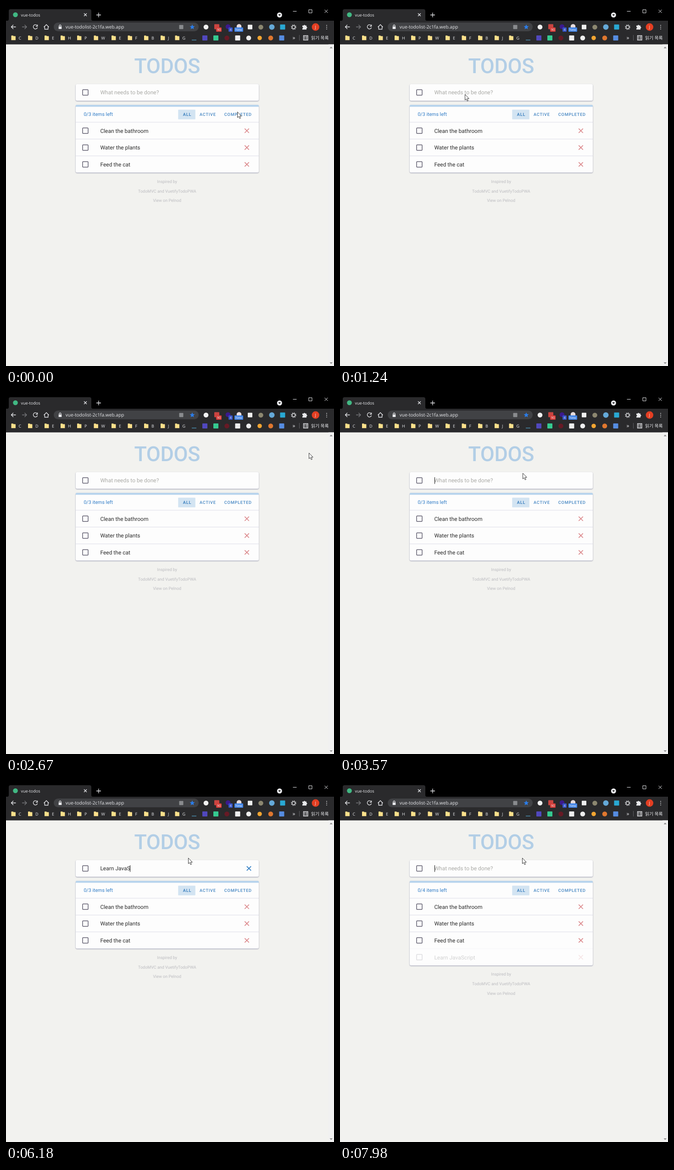
An HTML page that plays this animation: 715 px wide and 783 px high, repeating every 8000 ms.

```html
<!DOCTYPE html>
<html lang="en">
<head>
<meta charset="utf-8">
<title>Todo list</title>
<style>
html, body { margin: 0; width: 100%; height: 100%; overflow: hidden; background: #f2f2ef; }
svg { display: block; width: 715px; height: 783px; text-rendering: geometricPrecision; }
text { white-space: pre; }
.ui { font-family: "Open Sans", "Noto Sans", sans-serif; fill: #e9eaed; }
.app { font-family: Roboto, sans-serif; fill: #2b2b2b; font-size: 12px; }
.app .title { font-size: 45px; font-weight: 500; letter-spacing: -.38px; fill: #b2cee6; }
.app .button { font-size: 9.2px; font-weight: 500; letter-spacing: .75px; fill: #4385c2; }
.app .note { font-size: 9px; fill: #bcbcc0; text-anchor: middle; }
.line { fill: none; stroke: #e9eaed; stroke-width: 1.3; }
.card { fill: #fdfdfd; filter: drop-shadow(0 1px .8px #66688ca8); }
.middle { text-anchor: middle; }
</style>
</head>
<body>
<svg viewBox="0 0 715 783">
  <defs>
    <path id="cross" d="M-4.7-4.7 4.7 4.7M4.7-4.7-4.7 4.7" fill="none" stroke-width="1.7"/>
    <rect id="box" x="-6" y="-6" width="12" height="12" rx="1.2" fill="none" stroke="#625f70" stroke-width="1.5"/>
    <path id="folder" d="M0 .8Q0 0 .8 0H4L5 1.3H8.6Q9.4 1.3 9.4 2V10H0Z" fill="#fbe08b"/>
  </defs>

  <!-- Browser window -->
  <g class="ui">
    <rect width="715" height="33" fill="#000"/>
    <path d="M0 32H3Q6 32 6 28V11Q6 7 10 7H182Q186 7 186 11V28Q186 32 189 32H715V83.5H0Z" fill="#2a2a2c"/>
    <circle cx="20.5" cy="19" r="5.3" fill="#41b883"/>
    <text x="32.4" y="22.6" font-size="9.1">vue-todos</text>
    <g class="line">
      <path d="M170 16 176 22M176 16 170 22M197 19.5H207M202 14.5V24.5"/>
      <path d="M625.5 11.5H633.5M660 8H667V15H660ZM694.5 8 701.5 15M701.5 8 694.5 15" stroke-width="1"/>
      <path d="M21.5 45.5H11.5M16 41 11.5 45.5 16 50"/>
      <path d="M35 45.5H45M40.5 41 45 45.5 40.5 50" stroke="#77787b"/>
      <path d="M67.7 42.2A4.7 4.7 0 1 0 68.6 46.8M68.6 40.5V44H65"/>
      <path d="M82.5 46 88 40.5 93.5 46M84.3 45V50.5H91.7V45"/>
    </g>
    <circle cx="596.3" cy="19.5" r="5.5"/>
    <path d="M593.6 18.2H599L596.3 21.6Z" fill="#000"/>
    <rect x="104" y="36" width="316" height="19" rx="9.5" fill="#414245"/>
    <path d="M114.7 44.5H121.3V50H114.7Z"/>
    <path class="line" d="M116.1 44.5V43A1.9 1.9 0 0 1 119.9 43V44.5" stroke-width="1"/>
    <text x="129.7" y="49.2" font-size="10.15">vue-todolist-2c1fa.web.app</text>
    <path d="M406 40 407.6 43.7 411.6 44 408.5 46.6 409.5 50.6 406 48.4 402.5 50.6 403.5 46.6 400.4 44 404.4 43.7Z" fill="#2b7de9"/>
    <g id="icons"></g>
    <g id="badges" font-size="7.2" class="middle"></g>
    <circle class="line" cx="627" cy="46" r="3.3" stroke-width="2.2"/>
    <circle class="line" cx="627" cy="46" r="5.1" stroke-width="1.4" stroke-dasharray="2 2"/>
    <path d="M646 42.5H649A1.6 1.6 0 1 1 652.2 42.5H655V45.2A1.6 1.6 0 1 1 655 48.4V51.2H646V48.6A1.6 1.6 0 1 0 646 45.4Z"/>
    <circle cx="674.8" cy="45.8" r="8.2" fill="#e33e22"/>
    <text class="middle" x="674.8" y="49" font-size="9">J</text>
    <path class="line" d="M699 41.2V51" stroke-width="2" stroke-dasharray="2 2"/>
    <g id="bookmarks" font-size="9"></g>
    <text x="624.5" y="72.6" font-size="12">»</text>
    <path d="M639.5 63V75" stroke="#5f6064"/>
    <path class="line" d="M648.5 64.5H658V74H648.5ZM650 67H652M653.5 67H656.5M650 69.3H652M653.5 69.3H656.5M650 71.6H652M653.5 71.6H656.5" stroke-width=".9"/>
    <text x="665" y="72.7" font-size="9.9" style="font-family:'Noto Sans CJK KR','Noto Sans CJK',sans-serif">읽기 목록</text>
  </g>

  <!-- Page -->
  <rect x="703" y="83.5" width="12" height="700" fill="#f1f1f1"/>
  <path d="M705.5 92H712L708.7 88.4ZM705.5 775H712L708.7 778.6Z" fill="#8b8b8b"/>
  <g class="app">
    <text class="title middle" x="351.3" y="146.4">TODOS</text>

    <rect class="card" x="152" y="170" width="399" height="36" rx="3"/>
    <use href="#box" x="173" y="188"/>
    <text id="entry" x="205.4" y="192.2"></text>
    <path id="caret" d="M0 181V195.5" stroke="#111"/>
    <use id="clear" href="#cross" x="529.5" y="188" stroke="#2f7dc4"/>

    <rect id="list" class="card" x="152" y="215" width="399" rx="3"/>
    <path d="M152 219.3V217Q152 215 154 215H549Q551 215 551 217V219.3Z" fill="#b8d4ed"/>
    <text id="count" x="169.4" y="239.2" font-size="10.65" fill="#2f7bc6"></text>
    <rect x="375.3" y="225.6" width="37.5" height="21" rx="1" fill="#d3e4f2"/>
    <text class="button" x="385.8" y="239.3" style="fill:#2a74b8">ALL</text>
    <text class="button" x="422" y="239.3">ACTIVE</text>
    <text class="button" x="475.8" y="239.3">COMPLETED</text>
    <g id="rows"></g>

    <g id="footer">
      <text class="note" x="351.3" y="384.6">Inspired by</text>
      <text class="note" x="351.3" y="405.5">TodoMVC and VuetifyTodoPWA</text>
      <text class="note" x="351.3" y="426.4">View on Pelnod</text>
    </g>
  </g>
  <path id="pointer" d="M.5.3V12.7L3.3 10.2 5.4 14.8 7.4 13.9 5.4 9.4H9.2Z" fill="#fff" stroke="#222" stroke-width=".9"/>
</svg>
<script>
const LOOP = 8000, ROW = 36.6;
const TYPE_START = 3700, KEY_TIME = 240, FOCUS = 3400, SUBMIT = 7880, FADE = 500;
const NEW_TODO = "Learn JavaScript";
const el = id => document.getElementById(id);
const fill = (id, parts) => { el(id).innerHTML = parts.join(""); };

const dot = (x, y, color, r = 5.3) => `<circle cx="${x}" cy="${y}" r="${r}" fill="${color}"/>`;
const square = (x, y, color, s = 11) =>
  `<rect x="${x - s / 2}" y="${y - s / 2}" width="${s}" height="${s}" rx="1" fill="${color}"/>`;
const badge = (x, width, color, label) =>
  `<rect x="${x - width / 2}" y="46.5" width="${width}" height="9.5" rx="1.5" fill="${color}"/>
   <text x="${x}" y="53.8">${label}</text>`;

fill("icons", [
  square(382, 45.7, "#898b8e", 9), dot(436, 45.7, "#f1f1f1"), square(459.5, 45, "#c94440"),
  dot(484, 45, "#3b1a8c"), dot(508, 44.5, "#e8dcdc"), square(532, 45.7, "#eeeeee", 10),
  dot(555.5, 46, "#8c8770"), dot(579.5, 45.7, "#65a9d8", 6), square(603, 45.7, "#29a8d3")
]);
fill("badges", [
  badge(464, 12, "#d83b37", "90"), badge(489.5, 9, "#3553c9", "4"), badge(507.5, 19, "#4285e8", "New")
]);

const folderX = [11.5, 48, 84, 119, 155, 191.5, 230, 265.5, 301, 337, 368.5];
fill("bookmarks", [
  ...folderX.map((x, i) => `<use href="#folder" x="${x}" y="64.3"/>
    <text x="${x + 16}" y="72.6">${"CDEHPWEFBJG"[i]}</text>`),
  `<path d="M405 74H415" stroke="#4b91b5" stroke-width="1.4"/>`,
  square(433.5, 69.5, "#5148bd"), square(457.5, 69.5, "#35c990"), dot(481.5, 69.5, "#671a25"),
  square(505, 69.5, "#eeeeee"), dot(529, 69.5, "#eeeeee"), dot(553, 69.5, "#f2a532", 4.8),
  dot(577, 69.5, "#df772f"), square(601, 69.5, "#568ce0")
]);

fill("rows", ["Clean the bathroom", "Water the plants", "Feed the cat", NEW_TODO].map((label, i) =>
  `<g transform="translate(0 ${271.3 + i * ROW})">
    <path d="M152-18.5H551" stroke="#dcdce8"/>
    <use href="#box" x="173"/>
    <text x="205.4" y="4.4">${label}</text>
    <use href="#cross" x="525" stroke="#dc8a8d"/>
  </g>`));
const newRow = el("rows").lastElementChild;

// Pointer keys: time, x, y
const path = [
  [0, 504, 230], [60, 504, 230], [460, 276, 192], [700, 276, 192], [1000, 272, 192],
  [1900, 272, 192], [2500, 660, 128], [2800, 660, 128], [3350, 400, 185],
  [3450, 400, 185], [3650, 397, 165], [LOOP, 397, 165]
];

function pointerAt(t) {
  const i = path.findIndex(key => key[0] > t);
  const [t0, x0, y0] = path[i - 1], [t1, x1, y1] = path[i];
  const u = (t - t0) / (t1 - t0), s = u * u * (3 - 2 * u);
  return [x0 + (x1 - x0) * s, y0 + (y1 - y0) * s];
}

function draw(now) {
  const t = now % LOOP, added = t >= SUBMIT;
  const keys = Math.min(NEW_TODO.length, Math.floor((t - TYPE_START) / KEY_TIME) + 1);
  const typed = added ? "" : NEW_TODO.slice(0, Math.max(0, keys));

  const entry = el("entry");
  entry.textContent = typed || "What needs to be done?";
  entry.style.fill = typed ? "#2b2b2b" : "#aaaaa6";
  el("clear").style.opacity = typed ? 1 : 0;

  const lastKey = added ? SUBMIT : typed ? TYPE_START + (keys - 1) * KEY_TIME : FOCUS;
  const caretX = typed ? 205.4 + entry.getComputedTextLength() : 206;
  el("caret").setAttribute("transform", `translate(${Math.floor(caretX) + .5} 0)`);
  el("caret").style.opacity = t >= FOCUS && (t - lastKey) % 1000 < 500 ? 1 : 0;

  el("count").textContent = `0/${added ? 4 : 3} items left`;
  el("list").setAttribute("height", 147.3 + (added ? ROW : 0));
  el("footer").setAttribute("transform", `translate(0 ${added ? ROW : 0})`);
  newRow.style.opacity = added ? (t - SUBMIT) / FADE : 0;
  el("pointer").setAttribute("transform", `translate(${pointerAt(t)})`);
}

const start = performance.now();
function tick() {
  draw(performance.now() - start);
  requestAnimationFrame(tick);
}
tick();
</script>
</body>
</html>
```
